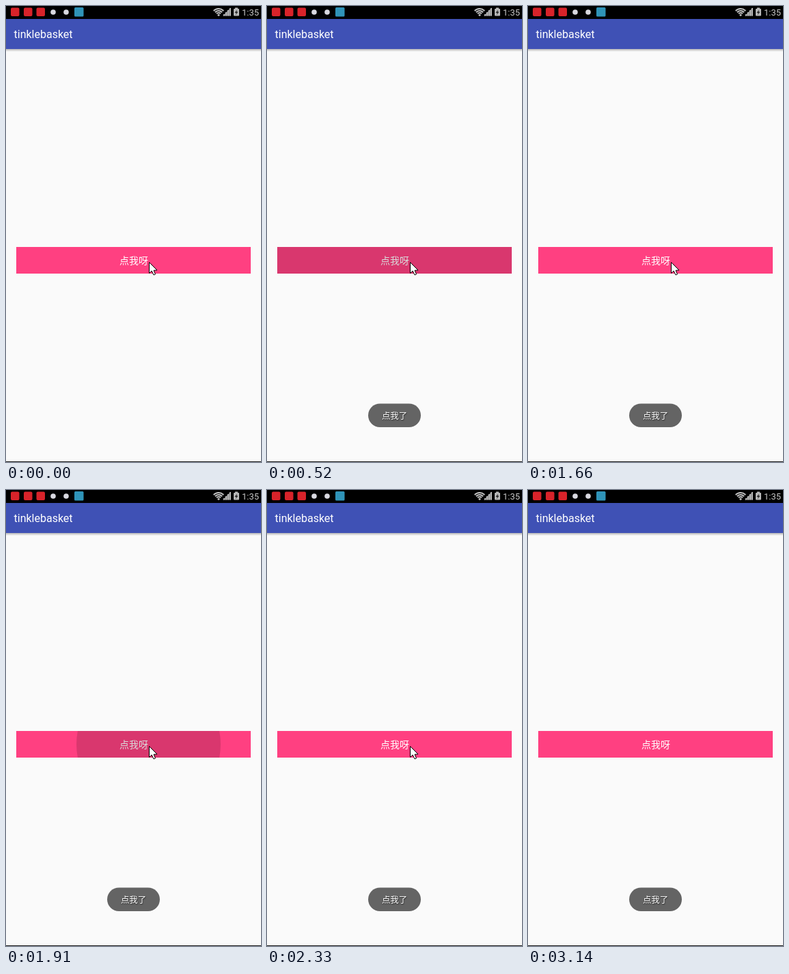
Write an HTML page with a canvas that moves like this. It is 373 px wide and 668 px high and loops after 3.26 s.

```html
<!DOCTYPE html>
<html lang="zh">
<head>
<meta charset="utf-8">
<style>
  html, body { margin: 0; width: 100%; height: 100%; overflow: hidden; background: #fafafa; }
  canvas { display: block; width: 373px; height: 668px; }
</style>
</head>
<body>
<canvas id="stage"></canvas>
<script>
const W = 373, H = 668, LOOP = 3260;
const SANS = 'Roboto, "Noto Sans", sans-serif';
const HAN = '"Noto Sans CJK SC", "Noto Sans CJK", sans-serif';
const BUTTON = { x: 15, y: 353, w: 343, h: 39 };

// The screen refreshes only at these moments.
const TICKS = [0, 120, 270, 390, 520, 670, 1660, 1780, 1910, 2060,
               2330, 2470, 2590, 2710, 2860, 2990, 3140];
const RIPPLE = { x: 208.5, y: 372.5, radius: 220, duration: 532, starts: [11, 1651] };
const POINTER_PATH = [
  [0, 209, 375], [2470, 190, 472], [2590, 158, 623], [2710, 321, 636],
  [2860, 331, 647], [2990, 340, 656], [3140, W, H]
];
const POINTER = [[0, 0], [0, 16], [3.7, 12.6], [6.5, 18.5], [9, 17.5], [6.6, 11.8], [11.5, 11.5]];

const canvas = document.getElementById('stage');
const ctx = canvas.getContext('2d');
const ratio = window.devicePixelRatio || 1;
canvas.width = W * ratio;
canvas.height = H * ratio;
ctx.scale(ratio, ratio);

function rect(x, y, w, h, color) {
  ctx.fillStyle = color;
  ctx.fillRect(x, y, w, h);
}

function rounded(x, y, w, h, r, color) {
  ctx.fillStyle = color;
  ctx.beginPath();
  ctx.roundRect(x, y, w, h, r);
  ctx.fill();
}

function disc(x, y, r, color) {
  ctx.fillStyle = color;
  ctx.beginPath();
  ctx.arc(x, y, r, 0, Math.PI * 2);
  ctx.fill();
}

function polygon(points, color) {
  ctx.fillStyle = color;
  ctx.beginPath();
  points.forEach(([x, y]) => ctx.lineTo(x, y));
  ctx.closePath();
  ctx.fill();
}

function label(text, x, y, font, color, align = 'left') {
  ctx.font = font;
  ctx.fillStyle = color;
  ctx.textAlign = align;
  ctx.fillText(text, x, y);
}

function drawWifi(x, y) {
  ctx.strokeStyle = '#c4c4c4';
  ctx.lineWidth = 2;
  for (const r of [4, 7, 10]) {
    ctx.beginPath();
    ctx.arc(x, y, r, -Math.PI * 0.76, -Math.PI * 0.24);
    ctx.stroke();
  }
  disc(x, y - 0.8, 1.5, '#c4c4c4');
}

function drawStatusBar() {
  rect(0, 0, W, 19, '#000');
  for (const x of [7, 26, 44.5]) rounded(x, 2.5, 12.5, 12.5, 2, '#d8232a');
  for (const x of [69, 88]) disc(x, 9, 3.8, '#d9d9e0');
  rounded(100, 2, 13.5, 13.5, 1.5, '#2f93b8');

  drawWifi(311, 14);
  polygon([[317, 14.5], [328.5, 14.5], [328.5, 2.5]], '#777');
  for (let i = 0; i < 4; i++) rect(318 + i * 3, 12 - i * 3, 1.8, 2.5 + i * 3, '#c4c4c4');

  rect(335, 2.5, 4, 2, '#b8b8b8');
  rounded(333, 4, 8, 10.5, 1, '#b8b8b8');
  polygon([[338, 5.5], [334.5, 10], [336.7, 10], [336, 13], [339.5, 8.5], [337.3, 8.5]], '#222');
  label('1:35', 370, 14, '13px ' + SANS, '#c8c8c8', 'right');
}

function drawAppBar() {
  rect(0, 19, W, 44, '#3f51b5');
  const shadow = ctx.createLinearGradient(0, 63, 0, 67);
  shadow.addColorStop(0, 'rgba(0,0,0,.27)');
  shadow.addColorStop(1, 'rgba(0,0,0,0)');
  rect(0, 63, W, 4, shadow);
  label('tinklebasket', 11.5, 47, '16px ' + SANS, '#fff');
}

function drawRipple(t) {
  for (const start of RIPPLE.starts) {
    const p = (t - start) / RIPPLE.duration;
    if (p <= 0 || p > 1) continue;
    const eased = (1 - Math.cos(Math.PI * p)) / 2;
    disc(RIPPLE.x, RIPPLE.y, RIPPLE.radius * eased, 'rgba(0,0,0,.15)');
  }
}

function drawButton(t) {
  const { x, y, w, h } = BUTTON;
  ctx.save();
  ctx.beginPath();
  ctx.rect(x, y, w, h);
  ctx.clip();
  rect(x, y, w, h, '#ff4081');
  label('点我呀', 187, 378, '14px ' + HAN, '#fff', 'center');
  drawRipple(t);
  ctx.restore();
}

function drawToast(t) {
  const alpha = Math.min(1, Math.max(0, (t - 80) / 250));
  if (!alpha) return;
  ctx.save();
  ctx.globalAlpha = alpha;
  rounded(148, 582.5, 77, 34.5, 17.2, '#646464');
  ctx.shadowColor = 'rgba(0,0,0,.7)';
  ctx.shadowBlur = 2;
  ctx.shadowOffsetX = ctx.shadowOffsetY = 0.6;
  label('点我了', 186.5, 605, '12.4px ' + HAN, '#fff', 'center');
  ctx.restore();
}

function drawPointer(t) {
  const [, x, y] = POINTER_PATH.findLast(([time]) => time <= t);
  ctx.save();
  ctx.translate(x + 0.5, y + 0.5);
  polygon(POINTER, '#fff');
  ctx.strokeStyle = '#000';
  ctx.lineWidth = 1;
  ctx.stroke();
  ctx.restore();
}

function draw(t) {
  rect(0, 0, W, H, '#fafafa');
  drawStatusBar();
  drawAppBar();
  drawButton(t);
  drawToast(t);
  rect(0, H - 1, W, 1, '#1c1c1c');
  drawPointer(t);
}

const origin = performance.now();

function loop() {
  const t = (performance.now() - origin) % LOOP;
  draw(TICKS.findLast(tick => tick <= t));
  requestAnimationFrame(loop);
}

loop();
</script>
</body>
</html>
```
